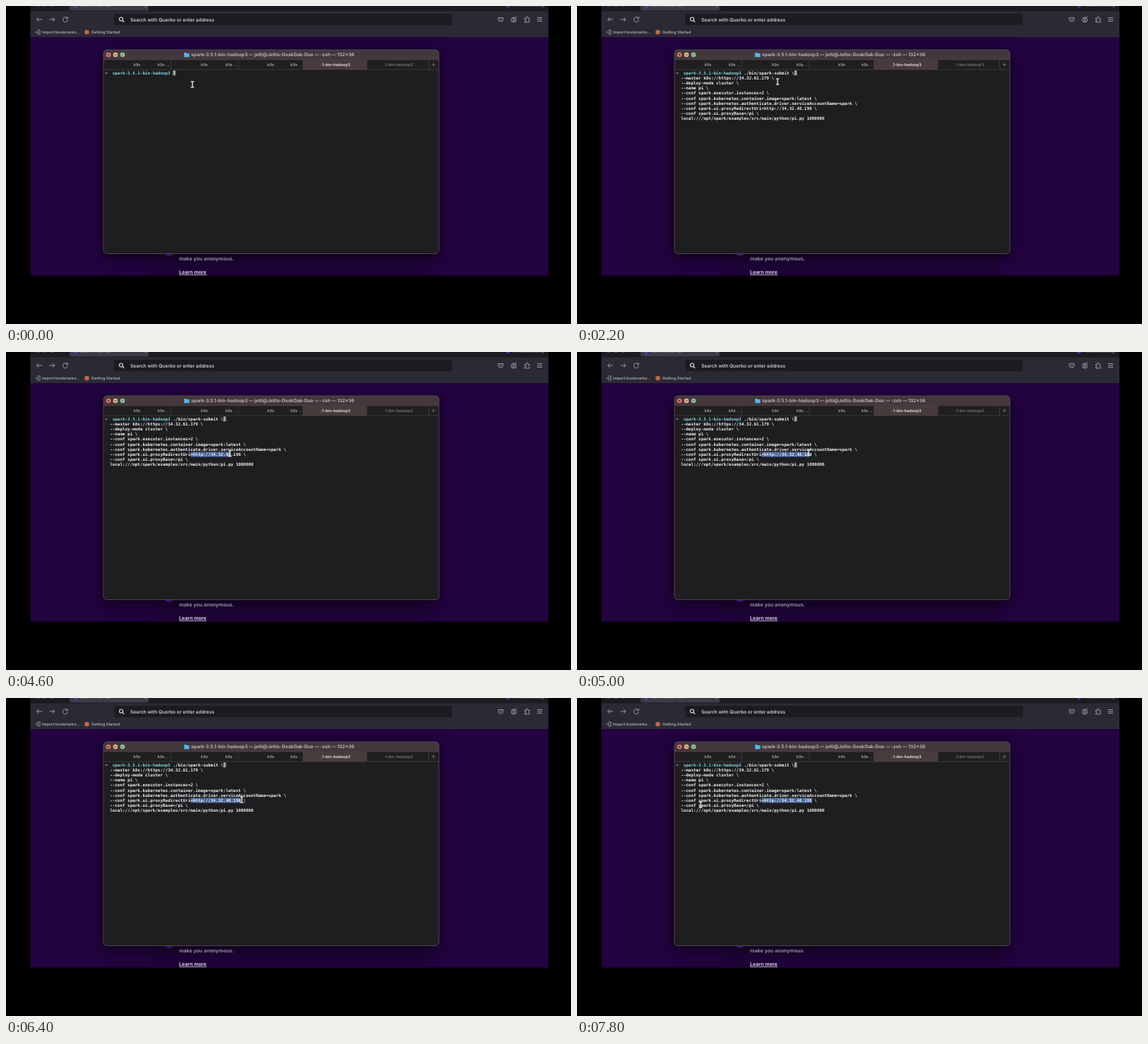
An HTML page for the animation above (8000 ms loop, 800 px wide and 450 px high).

```html
<!DOCTYPE html>
<html lang="en">
<head>
<meta charset="utf-8">
<title>Spark submit</title>
<style>
  html, body { margin: 0; width: 100%; height: 100%; overflow: hidden; background: #000; }
  svg { display: block; }
  text { font-family: Inter, "Liberation Sans", sans-serif; text-rendering: geometricPrecision; white-space: pre; }
  .mono text { font: bold 5.93px "DejaVu Sans Mono", monospace; fill: #f0f0f0; }
  .icon { fill: none; stroke: #a9a8b0; stroke-width: .9; }
  .bar { font-size: 5.55px; font-weight: 500; fill: #bdbcc4; }
  .tab { font-size: 5.6px; font-weight: 600; fill: #a5a3a3; text-anchor: middle; }
  .window { filter: drop-shadow(0 6px 11px rgba(0, 0, 0, .6)); }
</style>
</head>
<body>
<svg width="800" height="450" viewBox="0 0 800 450">
  <defs>
    <clipPath id="frame"><rect x="138" y="62" width="475" height="288.5" rx="5"/></clipPath>
  </defs>

  <!-- browser -->
  <svg width="768" height="381.5">
    <rect x="34.500" width="733.500" height="382" fill="#230340"/>
    <rect x="205" y="300" width="393" height="82" fill="#1f043a"/>
    <circle cx="231" cy="347" r="7" fill="#5a23a8"/>
    <g fill="#dcd6e2">
      <text x="245" y="360.3" font-size="7.15" font-weight="600">make you anonymous.</text>
      <text x="245" y="379.2" font-size="7" font-weight="700">Learn more</text>
      <path d="M245 380.4h39" stroke="#dcd6e2" stroke-width=".8"/>
    </g>

    <rect x="34.500" width="733.500" height="8" fill="#1c1b22"/>
    <rect x="90" y="-8" width="112" height="14.5" rx="2.5" fill="#3c3b46"/>
    <rect x="34.500" y="7.5" width="733.500" height="36.5" fill="#2b2a33"/>
    <g fill="#45444d">
      <circle cx="45" cy="-2" r="3.2"/><circle cx="55" cy="-2" r="3.2"/><circle cx="65" cy="-2" r="3.2"/>
    </g>
    <g opacity=".6">
      <circle cx="98" cy="0" r="3" fill="#7b35d6"/>
      <text class="bar" x="105" y="1.3">New Private Tab</text>
      <path class="icon" d="M196.500 -1l3 3m0-3l-3 3"/>
      <circle cx="711" cy="-.5" r="3" fill="#7b35d6"/>
      <text class="bar" x="717" y="1.3">Private browsing</text>
    </g>

    <g class="icon">
      <path d="M51 19h-7.5m3-3l-3 3l3 3M61.5 19h7.5m-3-3l3 3l-3 3"/>
      <path d="M86.6 17a3.5 3.5 0 1 0 .8 2.6M87.3 15v2.6h-2.6"/>
      <path d="M697 16.5h7v2a3.5 3.5 0 0 1-7 0zm1.8 1.5l1.7 1.6l1.7-1.6"/>
      <circle cx="719" cy="19.5" r="3.6"/><circle cx="719" cy="18.3" r="1.2"/>
      <path d="M716.6 22c1-1.8 3.8-1.8 4.8 0M721.5 15.5l1.5-1"/>
      <path d="M734.5 17.5h2v-1.2a1.2 1.2 0 0 1 2.4 0v1.2h2v5.5h-6.4v-1.6h1a1.1 1.1 0 0 0 0-2.2h-1z"/>
      <path d="M752 16.5h7m-7 2.5h7m-7 2.5h7"/>
    </g>
    <rect x="153" y="11" width="478.5" height="16.3" rx="2.5" fill="#1c1b22"/>
    <g class="icon" style="stroke:#dddce3;stroke-width:1.2"><circle cx="163" cy="18.5" r="2.5"/><path d="M165 20.5l2.3 2.3"/></g>
    <text x="176" y="21.6" font-size="6.7" font-weight="600" fill="#cfced6">Search with Querbo or enter address</text>

    <path class="icon" d="M44.5 34h3.5v5.8h-3.5M41.5 37h4m-1.5-1.5l1.5 1.5l-1.5 1.5"/>
    <text class="bar" x="51" y="39">Import bookmarks...</text>
    <circle cx="114.5" cy="37" r="3.3" fill="#b8694a"/>
    <text class="bar" x="121" y="39">Getting Started</text>
  </svg>

  <!-- terminal -->
  <g class="window">
    <g clip-path="url(#frame)">
      <rect x="138" y="62" width="475" height="289" fill="#1e1d1f"/>
      <rect x="138" y="62" width="475" height="14" fill="#43383b"/>
      <rect x="138" y="76" width="475" height="14" fill="#201e1f"/>
      <rect x="420.5" y="76" width="90.5" height="14" fill="#483b3c"/>
      <path d="M138 76h475M138 90h475M233.5 76v14M329 76v14M420.5 76v14M511 76v14M598.5 76v14" stroke="#4a4445" stroke-width=".7"/>
    </g>
    <rect x="138" y="62" width="475" height="288.5" rx="5" fill="none" stroke="#5a565a" stroke-width=".8"/>
  </g>
  <g stroke="#40262a" stroke-width=".8" fill="none">
    <circle cx="145" cy="69" r="3.3" fill="#e0746f" stroke="none"/>
    <circle cx="155" cy="69" r="3.3" fill="#e3b78c" stroke="none"/>
    <circle cx="165" cy="69" r="3.3" fill="#8fc3a0" stroke="none"/>
    <path d="M143.7 67.7l2.6 2.6m0-2.6l-2.6 2.6M153.2 69h3.6M163.7 70.3l2.6-2.6"/>
  </g>
  <path d="M252.2 66h2.8l.8 1h3.7v5.3h-7.3z" fill="#58b5e6"/>
  <text x="262" y="71.3" font-size="6.57" font-weight="700" fill="#bdb5b7">spark-3.5.1-bin-hadoop3 — jelti@Jeltis-DeskOak-Duo — -zsh — 132×36</text>
  <g id="tabs">
    <text class="tab" x="466" y="85" style="fill:#f0eaea">..1-bin-hadoop3</text>
    <text class="tab" x="555" y="85" style="font-weight:500;fill:#858283">..1-bin-hadoop3</text>
    <path d="M602.8 83h5m-2.5-2.5v5" stroke="#8d8a8b" stroke-width=".7"/>
  </g>

  <rect id="selection" x="261.4" y="141.3" height="7.2" fill="#46689c"/>
  <g class="mono">
    <text x="140" y="96.7" style="fill:#b9dcc0">➜</text>
    <text x="150.7" y="96.7" style="fill:#83d3e3">spark-3.5.1-bin-hadoop3</text>
    <g id="command"></g>
  </g>
  <rect id="caret" y="91.2" width="3.6" height="7" fill="#a09fa0"/>
  <g id="pointer" fill="none">
    <path id="beam" d="M-2.3-4.2q2.300 0 2.300 1.200v6q0 1.200-2.300 1.200M2.300-4.200q-2.300 0-2.300 1.200v6q0 1.200 2.300 1.200" stroke="#d8d8d8" stroke-width="1.5"/>
  </g>
</svg>
<script>
const $ = id => document.getElementById(id);
const CELL = 3.57, ROW = 7.17, LEFT = 140, SELECT_X = 261.4;
const PASTE = 600, REAPPEAR = 1800, DRAG = 3800, RELEASE = 6400, LOOP = 8000, STEP = 200;

const command = String.raw`./bin/spark-submit \
--master k8s://https://34.32.61.179 \
--deploy-mode cluster \
--name pi \
--conf spark.executor.instances=2 \
--conf spark.kubernetes.container.image=spark:latest \
--conf spark.kubernetes.authenticate.driver.serviceAccountName=spark \
--conf spark.ui.proxyRedirectUri=http://34.32.48.198 \
--conf spark.ui.proxyBase=/pi \
local:///opt/spark/examples/src/main/python/pi.py 1000000`;

// time, x, y of the mouse pointer
const path = [
  [0, 264, 111], [1800, 264, 111], [2200, 284, 107], [2800, 282, 118], [3600, 262, 144],
  [3800, 262, 144], [4600, 317, 143.5], [5200, 331.5, 142], [5800, 334, 144],
  [6600, 334, 144], [7800, 175, 151], [8000, 175, 151]
];

function addText(parent, content, x, y, className = "") {
  const text = document.createElementNS("http://www.w3.org/2000/svg", "text");
  text.textContent = content;
  text.setAttribute("x", x);
  text.setAttribute("y", y);
  text.setAttribute("class", className);
  parent.append(text);
}

command.split("\n").forEach((line, row) =>
  addText($("command"), line, LEFT + CELL * (row ? 2 : 27), 96.7 + ROW * row));
for (const x of [185.5, 281, 375]) addText($("tabs"), "k9s", x, 85, "tab");
for (const x of [223, 319, 411]) addText($("tabs"), "k9s …", x, 85.3, "tab");

function pointerAt(t) {
  const i = path.findIndex(point => point[0] > t);
  const [t0, x0, y0] = path[i - 1], [t1, x1, y1] = path[i];
  const u = (t - t0) / (t1 - t0), ease = u * u * (3 - 2 * u);
  return [x0 + (x1 - x0) * ease, y0 + (y1 - y0) * ease];
}

function draw() {
  const t = Math.floor(performance.now() % LOOP / STEP) * STEP;
  const [x, y] = pointerAt(t);
  const pasted = t >= PASTE;
  const cells = t < DRAG ? 0 : t >= RELEASE ? 20 : Math.round((x - SELECT_X) / CELL);
  $("command").style.display = pasted ? "" : "none";
  $("caret").setAttribute("x", LEFT + CELL * (pasted ? 47 : 27));
  $("selection").setAttribute("width", Math.min(20, cells) * CELL);
  $("pointer").style.display = pasted && t < REAPPEAR ? "none" : "";
  $("pointer").setAttribute("transform", `translate(${x} ${y})`);
  requestAnimationFrame(draw);
}
draw();
</script>
</body>
</html>
```
